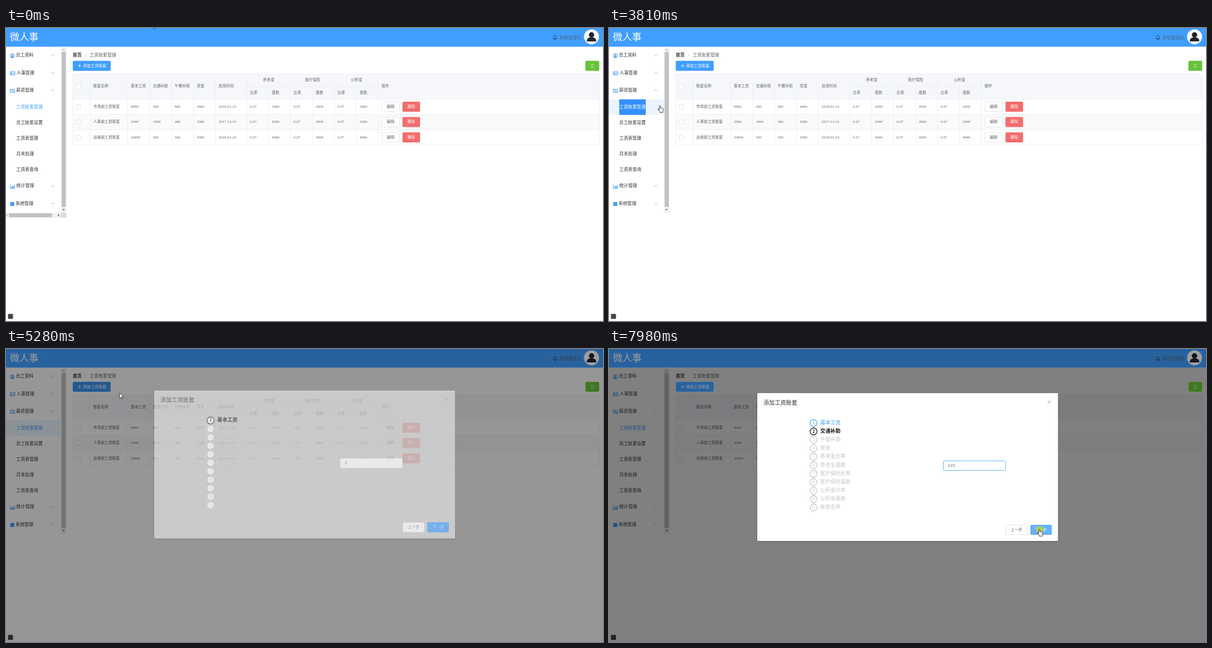
Animation, 1067 px wide and 525 px high, one loop 8000 ms. Source, as an HTML page with a canvas:

```html
<!DOCTYPE html>
<html lang="zh">
<head>
<meta charset="utf-8">
<style>
html, body { margin: 0; width: 1067px; height: 525px; overflow: hidden; background: #fff; }
canvas { display: block; }
</style>
</head>
<body>
<canvas id="stage" width="1067" height="525"></canvas>
<script>
const W = 1067, H = 525, LOOP = 8000;
const c = document.getElementById('stage').getContext('2d');
const SERIF = '"Liberation Serif", "Noto Sans CJK SC", "Noto Sans CJK", serif';
const SANS = '"Liberation Sans", Arial, sans-serif';
const BLUE = '#409eff', LIGHT_BLUE = '#66b1ff', INK = '#303133', GREY = '#606266',
      LINE = '#ebeef5', EDGE = '#dcdfe6', PALE = '#c0c4cc';

// Bursts of screen updates: start, end, number of updates
const BURSTS = [[130, 930, 13], [1000, 1660, 11], [1840, 2410, 10], [2540, 2590, 2], [2660, 3430, 12],
  [3500, 3630, 3], [3810, 4180, 5], [4500, 4570, 2], [4760, 5160, 7], [5230, 5540, 5],
  [5610, 5930, 6], [6000, 6390, 6], [6510, 7270, 13], [7340, 7980, 10]];

const POINTER = [[130, 262, -9], [790, 53, 112], [1000, 53, 113], [1660, 53, 117], [1840, 53, 118],
  [2340, 54, 126], [2660, 54, 126], [3430, 90, 138], [3810, 91, 139], [4180, 91, 141],
  [4430, 91, 141], [4570, 187, 91], [4760, 180, 84], [4980, 158, 67], [5160, 158, 67],
  [5610, 448, 142], [5930, 835, 294], [6060, 826, 320], [6390, 690, 208], [6860, 690, 208],
  [7150, 769, 325], [7340, 769, 323], [7530, 640, 208], [7640, 561, 210], [7780, 570, 212], [7960, 769, 323]];
const SHAPES = [[0, 'arrow'], [780, 'hand'], [4480, 'arrow'], [4860, 'hand'], [5060, 'arrow'],
  [6200, 'beam'], [6960, 'arrow'], [7060, 'hand'], [7400, 'arrow'], [7500, 'beam'], [7840, 'arrow'], [7920, 'hand']];
const PRESSES = [[725, 815], [2270, 2345], [3500, 3565], [3940, 4010], [5040, 5110], [6505, 6580], [7160, 7230], [7970, 8000]];
const ADD_COLOR = [[0, BLUE], [4860, LIGHT_BLUE], [5050, '#3a8ee6'], [5260, LIGHT_BLUE], [6510, BLUE]];
const VALUE = [[0, '0'], [6660, '1'], [6720, '12'], [6790, '123'], [7230, '0'], [7680, '1'], [7730, '12'], [7790, '123']];

const MENU = [['员工资料', 17.7], ['人事管理', 19], ['薪资管理', 18.2], ['统计管理', 18.6], ['系统管理', 17.3]];
const SUBMENU = ['工资账套管理', '员工账套设置', '工资表管理', '月末处理', '工资表查询'];
const STEPS = ['基本工资', '交通补助', '午餐补助', '奖金', '养老金比率', '养老金基数', '医疗保险比率',
  '医疗保险基数', '公积金比率', '公积金基数', '账套名称'];
const COLUMNS = [150.5, 217.5, 257, 296, 335.5, 374.5, 430.5, 469.5, 508.5, 548, 587, 626.5, 665.5];
const HEADS = ['账套名称', '基本工资', '交通补助', '午餐补助', '奖金', '启用时间'];
const ROWS = [
  ['市场部工资账套', 9000, 500, 800, 4000, '2018-01-23', 2000],
  ['人事部工资账套', 2000, 1000, 400, 2000, '2017-12-31', 2000],
  ['运维部工资账套', 20000, 500, 500, 3000, '2018-01-24', 4000]];
const ADD = [119.3, 58.7, 67.8, 18], REFRESH = [1035.5, 58.7, 24.8, 18];

const clamp = v => Math.min(1, Math.max(0, v));
const stateAt = (list, t) => list.reduce((v, [start, next]) => t >= start ? next : v, list[0][1]);

function bezier(x1, y1, x2, y2) {
  const f = (a, b, u) => 3 * a * u * (1 - u) ** 2 + 3 * b * u * u * (1 - u) + u ** 3;
  return p => {
    p = clamp(p);
    let lo = 0, hi = 1;
    for (let i = 0; i < 24; i++) {
      const mid = (lo + hi) / 2;
      if (f(x1, x2, mid) < p) lo = mid; else hi = mid;
    }
    return f(y1, y2, (lo + hi) / 2);
  };
}
const ease = bezier(.25, .1, .25, 1), easeInOut = bezier(.42, 0, .58, 1);

function snap(t) {
  let shown = 0;
  for (const [a, b, n] of BURSTS) {
    if (t < a) break;
    const step = (b - a) / (n - 1);
    shown = Math.min(b, a + Math.floor((t - a) / step + 1e-6) * step);
  }
  return shown;
}

function pointerAt(t) {
  const i = POINTER.findIndex(p => p[0] > t);
  if (i === 0) return POINTER[0].slice(1);
  if (i < 0) return POINTER[POINTER.length - 1].slice(1);
  const [t0, x0, y0] = POINTER[i - 1], [t1, x1, y1] = POINTER[i];
  const p = (t - t0) / (t1 - t0);
  return [x0 + (x1 - x0) * p, y0 + (y1 - y0) * p];
}

function text(s, x, y, size, color = GREY, { align = 'left', weight = '', family = SERIF } = {}) {
  c.font = `${weight} ${size}px ${family}`;
  c.textAlign = align;
  c.textBaseline = 'middle';
  c.fillStyle = color;
  c.fillText(s, x, y);
}
function rect(x, y, w, h, color) {
  c.fillStyle = color;
  c.fillRect(x, y, w, h);
}
function box(x, y, w, h, fill, edge, r = 2) {
  c.beginPath();
  c.roundRect(x, y, w, h, r);
  c.fillStyle = fill;
  c.fill();
  if (edge) { c.strokeStyle = edge; c.lineWidth = .8; c.stroke(); }
}
function path(d, color, width = .8, fill) {
  const p = new Path2D(d);
  if (fill) { c.fillStyle = fill; c.fill(p); }
  if (color) { c.strokeStyle = color; c.lineWidth = width; c.stroke(p); }
}
function disc(x, y, r, fill, edge, width = 1) {
  c.beginPath();
  c.arc(x, y, r, 0, Math.PI * 2);
  if (fill) { c.fillStyle = fill; c.fill(); }
  if (edge) { c.strokeStyle = edge; c.lineWidth = width; c.stroke(); }
}
function button(x, y, w, h, label, fill, color, edge) {
  box(x, y, w, h, fill, edge);
  text(label, x + w / 2, y + h / 2, 7, color, { align: 'center' });
}
function at(x, y, draw) {
  c.save();
  c.translate(x, y);
  draw();
  c.restore();
}

function header() {
  rect(0, 0, W, 33.5, BLUE);
  text('微人事', 7, 18, 17, '#fff');
  path('M977.5 19.5h7M978.5 19.5v-3a2.5 2.8 0 0 1 5 0v3M980 21h2M981 13v1', INK, .8);
  text('系统管理员', 989, 17.5, 7.9, '#50687f');
  disc(1046.5, 15.8, 13.4, '#fff');
  disc(1046.5, 12.3, 4.8, '#20242c');
  path('M1038 24c0-5 3-7 6-7h5c3 0 6 2 6 7z', null, 0, '#20242c');
}

const ICONS = [
  () => { disc(4, 0, 3.7, null, BLUE, 1); disc(4, -1, 1.5, BLUE); path('M1.3 2.6q2.7-4 5.4 0-2.7 2-5.4 0z', null, 0, BLUE); },
  () => { path('M.3-3h8.4v6h-8.4z', BLUE, .9); disc(2.7, -.8, 1, BLUE); rect(1.3, .5, 2.8, 1.4, BLUE); path('M5-1h2.8M5 1h2.8', BLUE, .8); },
  () => { path('M.3-2.8h8v5.6h-8z', BLUE, .9); disc(4.3, 0, 1.5, null, BLUE, .9); rect(.8, -2.3, 1.2, 1.2, BLUE); rect(6.6, 1.1, 1.2, 1.2, BLUE); },
  () => { path('M.4-4v7.6h8.6', BLUE, .8); [2, 4.3, 3.2, 5.8].forEach((h, i) => rect(1.4 + i * 1.9, 2.8 - h, 1.3, h, BLUE)); },
  () => rect(.3, -3.6, 7.2, 7.2, BLUE)
];

function sidebar(t) {
  const opening = t >= 2347;
  const open = 140 * (t < 2540 ? 1 - easeInOut((t - 817) / 300) : easeInOut((t - 2347) / 300));
  const bars = t < 817 || t >= 2647;
  const width = bars ? 98 : 107;
  const rowTop = i => 33.5 + 31.4 * i + (i > 2 ? open : 0);

  if (t >= 770 && t < 2850) rect(0, rowTop(2), width, 31.4, '#ecf5ff');
  MENU.forEach(([label, x], i) => {
    const y = rowTop(i) + 15.7;
    at(7.3, y + .5, ICONS[i]);
    text(label, x, y, 7.9, INK);
    const up = i === 2 && (t < 817 || opening && t >= 2540);
    at(bars ? 83.5 : 93, y - .5, () => path(up ? 'M-2.6 1.3L0-1.3 2.6 1.3' : 'M-2.6-1.3L0 1.3 2.6-1.3', '#909399', .7));
  });

  c.save();
  c.beginPath();
  c.rect(0, 127.7, width, open);
  c.clip();
  if (t >= 2850 && t < 5300) rect(0, 127.7, width, 28, '#ecf5ff');
  const selected = t >= 3565 && t < 4180;
  if (selected) rect(18.3, 127.7, 47.4, 28, '#3390ff');
  SUBMENU.forEach((s, i) => text(s, 18.3, 141.5 + 28 * i, 7.9, i ? INK : selected ? '#fff' : BLUE));
  c.restore();

  if (!bars) {
    rect(107, 33.5, .8, 157 + open, '#e6e6e6');
    return;
  }
  rect(98, 33.5, 10, 297.5, '#f1f1f1');
  rect(99.5, 43, 7.3, 277.5, '#c1c1c1');
  path('M101 40l2-2.4 2 2.4z', null, 0, '#a3a3a3');
  path('M101 324.5l2 2.4 2-2.4z', null, 0, '#505050');
  if (t < 817) {
    rect(0, 331, 98, 9, '#f1f1f1');
    rect(98, 331, 10, 9, '#dcdcdc');
    rect(5.5, 332, 76.5, 7, '#c1c1c1');
    path('M2 333.5L0 335.5l2 2z', null, 0, '#a3a3a3');
    path('M93 333.3l2.4 2.2-2.4 2.2z', null, 0, '#505050');
  }
}

function table() {
  const x0 = 119.5, x1 = 1060.5, tops = [82.5, 127.3, 154.8, 182.2, 209.8];
  rect(x0, 82.5, x1 - x0, 44.8, '#f5f7fa');
  rect(x0, tops[2], x1 - x0, 27.4, '#fafafa');
  tops.forEach(y => rect(x0, y - .4, x1 - x0, .9, LINE));
  rect(430.5, 104.6, 235, .9, LINE);
  [x0, ...COLUMNS, x1].forEach((x, i) => {
    const split = i > 7 && i < 13 && i % 2 === 0;
    const top = split ? 105 : 82.5;
    rect(x - .4, top, .9, 209.8 - top, LINE);
  });
  const cell = (s, col, y) => text(s, COLUMNS[col] + 5.6, y, 6.75);
  const checkbox = y => box(125.3, y - 3.9, 7.8, 7.8, '#fff', EDGE, 1);

  checkbox(104.5);
  HEADS.forEach((s, i) => cell(s, i, 104.5));
  ['养老金', '医疗保险', '公积金'].forEach((s, i) => {
    text(s, 469.5 + 78.5 * i, 93.5, 6.75, GREY, { align: 'center' });
    cell('比率', 6 + 2 * i, 116);
    cell('基数', 7 + 2 * i, 116);
  });
  cell('操作', 12, 104.5);

  ROWS.forEach((row, r) => {
    const y = 141.1 + 27.5 * r, base = row[6];
    checkbox(y);
    [...row.slice(0, 6), '0.07', base, '0.07', base, '0.07', base].forEach((s, i) => cell(s, i, y));
    button(671.6, y - 9, 31.2, 17.8, '编辑', '#fff', GREY, EDGE);
    button(708.6, y - 9, 31.4, 17.8, '删除', '#f56c6c', '#fff');
  });
}

function page(t) {
  rect(0, 0, W, H, '#fff');
  header();
  sidebar(t);
  text('首页', 119.3, 48.5, 7.9, INK, { weight: 'bold' });
  path('M141 46l2.4 2.5-2.4 2.5', PALE, .8);
  text('工资账套管理', 149.6, 48.5, 7.9);
  box(...ADD, stateAt(ADD_COLOR, t));
  path('M128.5 67.6h6M131.5 64.6v6', '#fff', .8);
  text('添加工资账套', 137.6, 67.7, 7, '#fff');
  box(...REFRESH, '#67c23a');
  path('M1045.6 67a2.4 2.4 0 0 1 4.4-1v-1.2M1050.4 68.2a2.4 2.4 0 0 1-4.4 1v1.2', '#fff', .8);
  table();
  box(3.5, 512.3, 9, 9, '#444', null, 1.5);
}

function dim(p) {
  const shade = a => `rgba(0,0,0,${a})`;
  c.beginPath();
  [[0, 33.5, W, H - 33.5], ADD, REFRESH].forEach(r => c.rect(...r));
  c.fillStyle = shade(.5 * p);
  c.fill('evenodd');
  // Saturated areas stay a little brighter
  [[0, 0, W, 33.5], ADD, REFRESH].forEach(r => rect(...r, shade(Math.min(.5 * p, .38))));
}

function dialog(t, p) {
  c.save();
  c.globalAlpha = p;
  c.translate(0, -11.2 * (1 - p));
  c.shadowColor = 'rgba(0,0,0,.3)';
  c.shadowBlur = 3;
  c.shadowOffsetY = 1;
  box(265, 79, 537.5, 265, '#fff', null, 1);
  c.shadowColor = 'transparent';
  text('添加工资账套', 276, 97, 10.1, INK);
  path('M784.3 92.3l5.2 5.2m0-5.2l-5.2 5.2', '#909399', .8);

  const active = t >= 7230 ? 1 : 0;
  STEPS.forEach((s, i) => {
    const y = 132.5 + 15.15 * i;
    const color = i < active ? BLUE : i === active ? '#111' : PALE;
    const weight = i === active ? 'bold' : '';
    if (i < STEPS.length - 1) rect(365, y + 6, 1.1, 3.2, i < active ? BLUE : PALE);
    disc(365.6, y, 6.2, '#fff', color, 1.2);
    text(i + 1, 365.6, y + .2, 7.9, color, { align: 'center', weight });
    text(s, 377.6, y, 9.05, color, { weight });
  });

  const focused = t >= 6510 && !(t >= 7230 && t < 7520);
  const value = stateAt(VALUE, t);
  box(597.5, 200.5, 111, 17, '#fff', focused ? BLUE : EDGE);
  const marked = focused && value === '0' && (t >= 6580 && t < 6660 || t >= 7600);
  if (marked) rect(605.3, 204.5, 4.6, 9, '#3390ff');
  text(value, 605.6, 209.2, 7.5, marked ? '#fff' : GREY, { family: SANS });

  const hover = t >= 7060 && t < 7400 || t >= 7920;
  button(709.5, 315.5, 38, 17, '上一步', '#fff', GREY, EDGE);
  button(753, 315, 38.5, 18, '下一步', hover ? LIGHT_BLUE : BLUE, '#fff');
  c.restore();
}

function pointer(t) {
  const [x, y] = pointerAt(t);
  if (PRESSES.some(([a, b]) => t >= a && t < b)) disc(x + .6, y + 1, 6.8, 'rgba(190,215,40,.75)');
  at(x, y, () => {
    const shape = stateAt(SHAPES, t);
    if (shape === 'arrow') path('M0 0v9.6l2.2-2 1.5 3.5 1.5-.7-1.5-3.3h3z', '#111', .7, '#fff');
    else if (shape === 'beam') path('M-1.8-4.5h3.6M0-4.5v9M-1.8 4.5h3.6', '#111', .8);
    else path('M-1 7.5V.9Q0-.6 1.1.9v3.5q1.2-.7 1.9.4 1.1-.6 1.8.5 1.4-.3 1.4 1.2 0 2.6-1.1 4.2v1.6H0v-1.4L-3.3 7q-.2-1.6 1.2-1z', '#111', .8, '#fff');
  });
}

function draw(now) {
  const t = snap(now % LOOP);
  page(t);
  const since = t - 5125;
  if (since > 0) {
    dim(ease(since / 200));
    dialog(t, ease(since / 300));
  }
  pointer(t);
}

let start;
function tick(now) {
  start ??= now;
  draw(now - start);
  requestAnimationFrame(tick);
}
draw(0);
requestAnimationFrame(tick);
</script>
</body>
</html>
```
